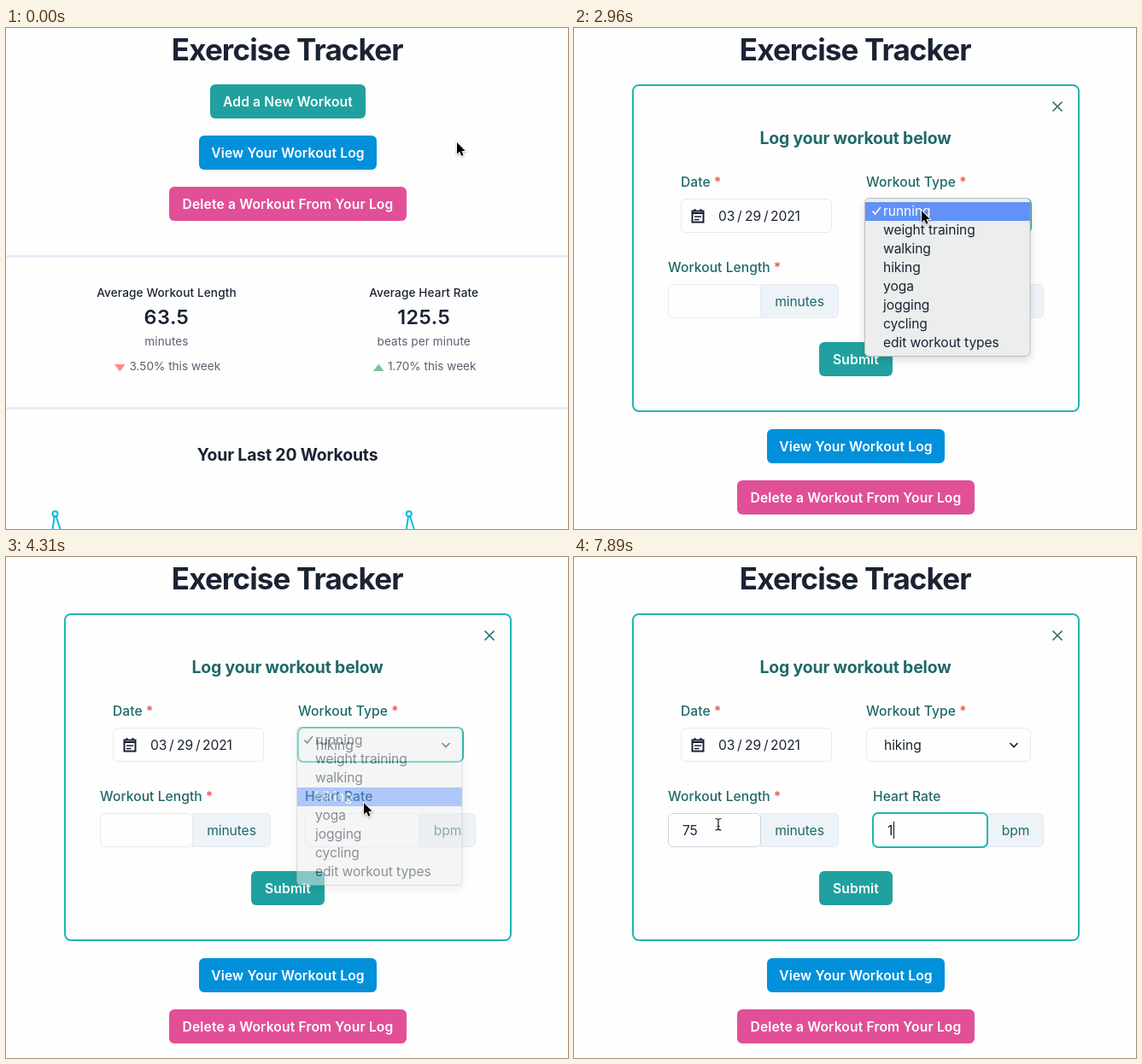
Recreate the animation shown at these times as an HTML page. Size 658 by 587 pixels, loop 8 s.

```html
<!DOCTYPE html>
<html lang="en">
<head>
<meta charset="utf-8">
<title>Exercise Tracker</title>
<style>
html, body { margin: 0; width: 100%; height: 100%; overflow: hidden; background: #fefefe; }
svg { display: block; width: 658px; height: 587px; font-family: Inter, "Open Sans", sans-serif; font-optical-sizing: none; }
text { white-space: pre; }
</style>
</head>
<body>
<svg id="stage" viewBox="0 0 658 587"></svg>
<script>
const LOOP = 8000, TICK = 148.3;
const INK = '#1a2333', TEAL = '#20a19f', FOCUS = '#20b7b0', LABEL = '#1f6869';
const LINE = '#e6e9f3', HOVER = '#c8d5e4', GREY = '#596070', RED = '#f5483f';
const TRACK = { 400: -.005, 500: .004, 600: .01, 700: -.008 };  // em, by weight
const TYPES = ['running', 'weight training', 'walking', 'hiking', 'yoga', 'jogging', 'cycling', 'edit workout types'];
const stage = document.getElementById('stage');

// Cursor keys: time, x, y
const PATH = [
  [150, 528, 134], [1040, 387, 96], [2080, 387, 96], [2670, 405, 213], [2960, 407, 214],
  [3260, 412, 222], [3860, 419, 288], [4450, 419, 288], [4750, 270, 326], [5050, 168, 315], [5340, 169, 313]
];

function cursorAt(t) {
  t = Math.floor(t / TICK + .05) * TICK;
  const i = PATH.findIndex(k => k[0] > t);
  if (i < 0) return PATH[PATH.length - 1].slice(1);
  if (!i) return PATH[0].slice(1);
  const a = PATH[i - 1], b = PATH[i];
  const u = (t - a[0]) / (b[0] - a[0]), e = u * u * (3 - 2 * u);
  return [1, 2].map(n => Math.round(a[n] + (b[n] - a[n]) * e));
}

const text = (x, y, s, o = {}) => {
  const { size = 15.6, fill = INK, weight = 400, anchor = 'start', track = TRACK[weight] } = o;
  return `<text x="${x}" y="${y}" font-size="${size}" font-weight="${weight}" fill="${fill}" text-anchor="${anchor}" letter-spacing="${track * size}">${s}</text>`;
};
const mid = (x, y, s, o) => text(x, y, s, { ...o, anchor: 'middle' });
const rect = (x, y, w, h, r, fill, more = '') =>
  `<rect x="${x}" y="${y}" width="${w}" height="${h}" rx="${r}" fill="${fill}" ${more}/>`;
const path = (d, stroke, width = 1.5, fill = 'none') =>
  `<path d="${d}" fill="${fill}" stroke="${stroke}" stroke-width="${width}"/>`;
const at = (x, y, s, scale = 1) => `<g transform="translate(${x} ${y}) scale(${scale})">${s}</g>`;

const button = (x, y, w, s, fill) =>
  rect(x, y, w, 40, 6, fill) + mid(x + w / 2, y + 26, s, { fill: '#fff', weight: 600 });
const label = (x, y, s, star) =>
  text(x, y, s + (star ? ` <tspan fill="${RED}">*</tspan>` : ''), { fill: LABEL, weight: 500 });
const caret = (x) => rect(x, 310, 1, 20, 0, '#111');

// Field outline; focus runs from 0 (plain) to 1 (ring)
const field = (x, y, w, focus = 0, line = LINE) =>
  rect(x + .5, y + .5, w - 1, 39, 5.5, '#fefefe', `stroke="${line}"`) +
  (focus ? rect(x, y, w, 40, 6, 'none', `stroke="${FOCUS}" stroke-width="2" opacity="${focus}"`) : '');
const addon = (x, w, s) =>
  path(`M${x + .5} 300.5H${x + w - 6}q5.5 0 5.5 5.5v28q0 5.5-5.5 5.5H${x + .5}z`, LINE, 1, '#eef3f8') +
  mid(x + w / 2, 326, s, { fill: LABEL });

const title = () => mid(329.2, 38, 'Exercise Tracker', { size: 35, weight: 700, track: -.0245 });
const heading = (y, s, fill) => mid(329.5, y, s, { size: 19.4, weight: 700, fill });
const viewLog = y => button(226, y, 208, 'View Your Workout Log', '#0290da');
const remove = y => button(191, y, 278, 'Delete a Workout From Your Log', '#e15097');

function stat(x, name, value, unit, change, tri, color, textX) {
  return mid(x, 315, name, { size: 13.6, weight: 500, track: .009 }) +
    mid(x, 347, value, { size: 23.4, weight: 600, track: .02 }) +
    mid(x, 372, unit, { size: 13.6, fill: GREY, track: .006 }) +
    path(tri, 'none', 0, color) +
    text(textX, 401, change + ' this week', { size: 13.6, fill: GREY, track: 0 });
}

const marker = x => at(x, 569.2,
  '<circle r="3" fill="none" stroke="#06bbdf" stroke-width="2"/>' + path('M-.8 3L-2.9 18M1.2 3L6 18', '#06bbdf', 2));

function home(t) {
  const add = t < 1330 ? TEAL : t < 1480 ? '#219492' : '#228786';
  return title() + button(239, 66, 182, 'Add a New Workout', add) + viewLog(126) + remove(186) +
    rect(0, 266, 658, 3, 0, '#f0e9fe') + rect(0, 444, 658, 3, 0, '#f0e9fe') +
    stat(188, 'Average Workout Length', '63.5', 'minutes', '3.50%', 'M127 394h12.5l-6.2 8.5z', '#ff8a88', 144.5) +
    stat(489.2, 'Average Heart Rate', '125.5', 'beats per minute', '1.70%', 'M430 402h12.5l-6.2-8.5z', '#74c69a', 447) +
    heading(507, 'Your Last 20 Workouts', INK) + marker(57.5) + marker(471.8);
}

function menu(t, y) {
  const fade = t < 4300 ? 1 : .5;
  const flash = t >= 4160 && t < 4300;
  const active = flash ? -1 : Math.floor((y - 204) / 22);
  const rows = TYPES.map((s, i) => (i === active ? rect(341, 204 + 22 * i, 193, 22, 0, '#6291f7') : '') +
    text(362, 220 + 22 * i, s, { fill: i === active ? '#fff' : INK })).join('');
  return `<g opacity="${fade}">` +
    rect(340.5, 199.5, 193.5, 185, 5, '#eceded', 'stroke="#bcbfc0" style="filter:drop-shadow(0 4px 5px #0002)"') + rows +
    path('M349.5 214.5l3 3.5 6.5-8', active === 0 ? '#fff' : INK, 1.7) + '</g>';
}

function calendar() {
  return path('M138.5 214.5h13v13h-13zM138.5 217h13M141.5 212v2M148.5 212v2', INK, 2) +
    path('M141 221h8M141 224.5h5.5', INK, 1.5);
}

function form(t, y) {
  const pick = t < 2820 ? 0 : t < 5050 ? 1 : t < 5200 ? .6 : 0;
  const pickLine = t >= 2670 && t < 2820 ? HOVER : LINE;
  const heart = t < 6840 ? 0 : t < 6990 ? .3 : t < 7140 ? .7 : 1;
  const length = t < 5050 ? 0 : t < 5200 ? .3 : 1 - heart;
  const minutes = t < 6240 ? '' : t < 6390 ? '7' : '75';
  const bpm = t < 7890 ? '' : '1';

  let s = title() + rect(69, 67, 522, 382, 7, '#fefefe', `stroke="${FOCUS}" stroke-width="2"`) +
    path('M560.5 86.5l11 11m0-11l-11 11', LABEL) +
    heading(136, 'Log your workout below', LABEL) +
    label(125, 186, 'Date', 1) + label(342, 186, 'Workout Type', 1) +
    label(110, 286, 'Workout Length', 1) + label(350, 286, 'Heart Rate') +
    field(125, 200, 177) + calendar() +
    text(169, 226, '03') + text(191, 226, '/') + text(200, 226, '29') + text(222, 226, '/') + text(230, 226, '2021') +
    field(342, 200, 193, pick, pickLine) +
    text(363, 226, t < 4300 ? 'running' : 'hiking') + path('M510.5 218l4.5 4.5 4.5-4.5', INK, 1.7) +
    addon(218, 92, 'minutes') + field(110, 300, 109, length, t < 4900 ? LINE : HOVER) +
    addon(484, 66, 'bpm') + field(350, 300, 134, heart) +
    text(127, 326, minutes) + text(367, 326, bpm) +
    button(287, 368, 86, 'Submit', TEAL) + viewLog(470) + remove(530);

  if (t >= 5050 && t < 5640) s += caret(127);
  if (t >= 6240 && t < 6840) s += caret(t < 6390 ? 136 : 146);
  if (t >= 6840 && t < 7590) s += caret(367);
  if (t >= 7890) s += caret(374);
  if (t >= 2820 && t < 4450) s += menu(t, y);
  if (t >= 5940 && t < 6240) {
    s += rect(169.5, 333.5, 131, 21, 0, '#efefef', 'stroke="#d2d2d2"') +
      text(175, 348, 'Please fill out this field.', { size: 10.7, track: 0 });
  }
  return s;
}

const arrowShape = 'M0 0V15.2L3.5 12 5.9 17.4 8.3 16.4 6 11.1H10.7Z';
const arrow = at(0, 0, `<g style="filter:drop-shadow(0 1px 1px #0005)">${path(arrowShape, '#fff', 2)}${path(arrowShape, 'none', 0, '#000')}</g>`, .9);
const hand = at(-1, -1,
  path('M1 0c1-.5 2 .1 2.3 1.2l1 3.8c.9-.7 2.2-.3 2.5.7.8-.4 1.8 0 2 .8 1-.2 1.6.5 1.6 1.6v3c0 2-1.4 2.6-1.4 4.4h-7c-.4-1.8-3-4-4.2-5.8-.8-1.2.6-2.3 1.8-1.4l1.6 1.3L-.1 1.8C-.3 1 .2.2 1 0z', '#000', 1.1, '#fff') +
  path('M4.2 10.5v3M6.2 10.5v3M8.2 10.5v3', '#000', .8), 1.06);
const beamShape = 'M-3.5-6.5q3 0 3.5 1.5q.5-1.5 3.5-1.5M0-5V5.5M-3.5 7q3 0 3.5-1.5q.5 1.5 3.5 1.5M-1.5 2.5h3';
const beam = path(beamShape, '#fff', 2.4) + path(beamShape, '#111', 1.2);

let shown = '';
function draw() {
  const t = performance.now() % LOOP;
  const [x, y] = cursorAt(t);
  const pointer = t >= 1330 && t < 1920 ? hand : t > 4500 && x < 310 && y > 300 ? beam : arrow;
  const svg = (t < 1920 ? home(t) : form(t, y)) + at(x, y, pointer);
  if (svg !== shown) stage.innerHTML = shown = svg;
  requestAnimationFrame(draw);
}
draw();
</script>
</body>
</html>
```
